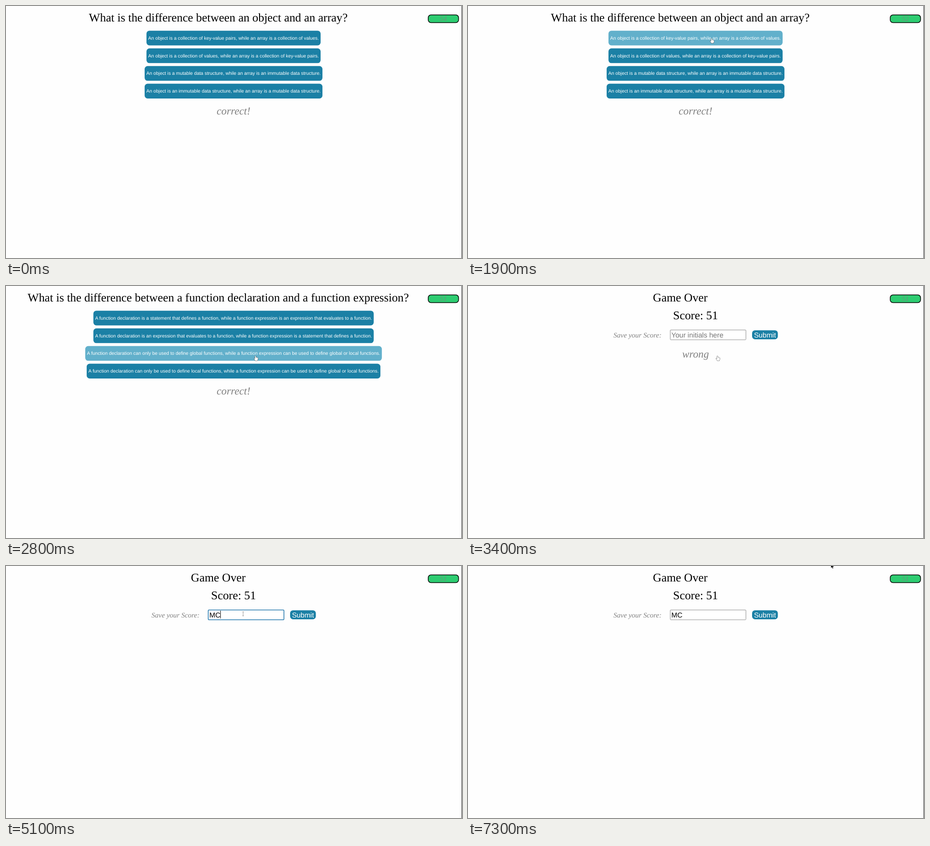
Animation of 1000x553 px, one loop 7.9 s. Source, as an HTML page with a canvas:

```html
<!DOCTYPE html>
<html lang="en">
<head>
<meta charset="utf-8">
<title>Code quiz</title>
<style>
  html, body { margin: 0; width: 100%; height: 100%; overflow: hidden; background: #fefefe; }
  canvas { display: block; }
</style>
</head>
<body>
<canvas id="stage" width="1000" height="553"></canvas>
<script>
const ctx = document.getElementById('stage').getContext('2d');
const LOOP = 7900, CENTER = 499, HEADING_CENTER = 465.5;
const SERIF = '"Liberation Serif", serif', SANS = '"Liberation Sans", sans-serif';
const BLUE = '#1b80a5', LIGHT = '#62b0cb', GREY = '#808080';

const questions = [
  {
    title: 'What is the difference between an object and an array?',
    answers: [
      'An object is a collection of key-value pairs, while an array is a collection of values.',
      'An object is a collection of values, while an array is a collection of key-value pairs.',
      'An object is a mutable data structure, while an array is an immutable data structure.',
      'An object is an immutable data structure, while an array is a mutable data structure.'
    ]
  },
  {
    title: 'What is the difference between a function declaration and a function expression?',
    answers: [
      'A function declaration is a statement that defines a function, while a function expression is an expression that evaluates to a function.',
      'A function declaration is an expression that evaluates to a function, while a function expression is a statement that defines a function.',
      'A function declaration can only be used to define global functions, while a function expression can be used to define global or local functions.',
      'A function declaration can only be used to define local functions, while a function expression can be used to define global or local functions.'
    ]
  }
];

// Pointer tip: time, x, y
const pointerPath = [
  [100, 541, 212], [400, 535, 76], [600, 534, 69], [2100, 534, 71], [2200, 535, 81],
  [2300, 535, 92], [2800, 547, 153], [3800, 547, 153], [4300, 520, 105],
  [5500, 520, 105], [6100, 650, 106], [7000, 650, 106], [7300, 796, -5]
];

function pointerAt(time) {
  if (time < pointerPath[0][0]) return null;
  const next = pointerPath.findIndex(point => point[0] > time);
  if (next < 0) return pointerPath.at(-1).slice(1);
  const [t0, x0, y0] = pointerPath[next - 1], [t1, x1, y1] = pointerPath[next];
  const k = (time - t0) / (t1 - t0);
  return [x0 + (x1 - x0) * k, y0 + (y1 - y0) * k];
}

function text(string, x, y, font, color = '#000', align = 'center') {
  ctx.font = font;
  ctx.fillStyle = color;
  ctx.textAlign = align;
  ctx.fillText(string, x, y);
}

function box(x, y, w, h, radius, fill, stroke, lineWidth = 1) {
  ctx.beginPath();
  ctx.roundRect(x, y, w, h, radius);
  ctx.fillStyle = fill;
  ctx.fill();
  if (stroke) {
    ctx.strokeStyle = stroke;
    ctx.lineWidth = lineWidth;
    ctx.stroke();
  }
}

const inside = (p, x, y, w, h) => p && p[0] >= x && p[0] <= x + w && p[1] >= y && p[1] <= y + h;
const heading = (string, x, y) => text(string, x, y, `25.86px ${SERIF}`);
const verdict = (string, y) => text(string, CENTER, y, `italic 23.27px ${SERIF}`, GREY);

function button(label, x, y, w, h, size, baseline, pointer) {
  const hover = inside(pointer, x, y, w, h);
  box(x, y, w, h, 6.5, hover ? LIGHT : BLUE);
  text(label, x + w / 2, baseline, `${size}px ${SANS}`, '#fff');
  return hover;
}

function drawQuestion({ title, answers }, pointer) {
  let hover = false;
  heading(title, HEADING_CENTER, 34);
  answers.forEach((answer, i) => {
    const y = 54.2 + i * 38.8;
    ctx.font = `10.35px ${SANS}`;
    const w = ctx.measureText(answer).width + 7.6;
    hover = button(answer, CENTER - w / 2, y, w, 32.3, 10.35, y + 19.6, pointer) || hover;
  });
  verdict('correct!', 238);
  return hover ? 'hand' : 'arrow';
}

function drawGameOver(time, pointer) {
  heading('Game Over', HEADING_CENTER, 34);
  heading('Score: 51', CENTER, 73);
  text('Save your Score:', 319, 112.5, `italic 15.5px ${SERIF}`, GREY, 'left');

  const typed = time >= 5100 ? 'MC' : time >= 4900 ? 'M' : '';
  const focused = time >= 4600 && time < 6300;
  box(443.5, 96.5, 166, 21.5, 1.5, '#fff', focused ? '#2377ad' : '#8c8c8c', focused ? 1.6 : 1);
  text(typed || 'Your initials here', 446, 112.5, `15.5px ${SANS}`, typed ? '#000' : '#757575', 'left');
  if (focused) {
    const lastEdit = time >= 5100 ? 5100 : time >= 4900 ? 4900 : 4600;
    const caretX = 446 + (typed ? ctx.measureText(typed).width : 0);
    if (Math.floor((time - lastEdit) / 500) % 2 === 0) {
      ctx.fillStyle = '#000';
      ctx.fillRect(Math.round(caretX), 98, 1, 17);
    }
  }

  const overSubmit = button('Submit', 623, 97.2, 56.5, 19.8, 15.5, 112.5, pointer);
  if (time < 4300) verdict('wrong', 157);
  if (overSubmit || time < 3900) return 'hand';
  return inside(pointer, 443, 96, 167, 22) ? 'beam' : 'arrow';
}

const shapes = {
  arrow: new Path2D('M0 0V9L2 7.2L3.5 10.6L5 10L3.6 6.7H6.4Z'),
  hand: new Path2D('M-.8 .7Q0-.5 .8 .7V3.6L2.4 3.8L4 4.3L5.5 5.1V7.5L4.5 9.4V10.8H-.7V9.8L-3.2 6.6Q-3.1 5.3-1.9 6L-.8 7Z'),
  beam: new Path2D('M-1.5-4.5H1.5M0-4.5V4.5M-1.5 4.5H1.5')
};

function drawPointer([x, y], kind) {
  ctx.save();
  ctx.translate(x, y);
  ctx.lineJoin = 'round';
  if (kind === 'beam') {
    ctx.strokeStyle = '#777';
    ctx.lineWidth = 0.8;
  } else {
    const dark = kind === 'arrow';
    ctx.strokeStyle = dark ? '#fff' : '#222';
    ctx.lineWidth = dark ? 1.4 : 1;
    ctx.fillStyle = dark ? '#111' : '#fff';
  }
  ctx.stroke(shapes[kind]);
  if (kind !== 'beam') ctx.fill(shapes[kind]);
  ctx.restore();
}

function draw(now) {
  const time = Math.floor(now % LOOP / 100) * 100;
  const pointer = pointerAt(time);
  ctx.textRendering = 'geometricPrecision';
  ctx.fillStyle = '#fefefe';
  ctx.fillRect(0, 0, 1000, 553);
  ctx.fillStyle = '#333';
  ctx.fillRect(999, 0, 1, 553);

  const secondsLeft = time < 900 ? 54 : time < 1900 ? 53 : time < 2800 ? 52 : 51;
  box(925.9, 19.6, 66.6, 16.8, 6, '#2ecc71', '#000', 1.5);
  text(secondsLeft, 959, 33, `italic 15.5px ${SERIF}`, 'rgba(128,128,128,.75)');

  const kind = time < 3400
    ? drawQuestion(questions[time < 2100 ? 0 : 1], pointer)
    : drawGameOver(time, pointer);
  if (pointer) drawPointer(pointer, kind);
}

const start = performance.now();
function tick() {
  draw(performance.now() - start);
  requestAnimationFrame(tick);
}
tick();
</script>
</body>
</html>
```
